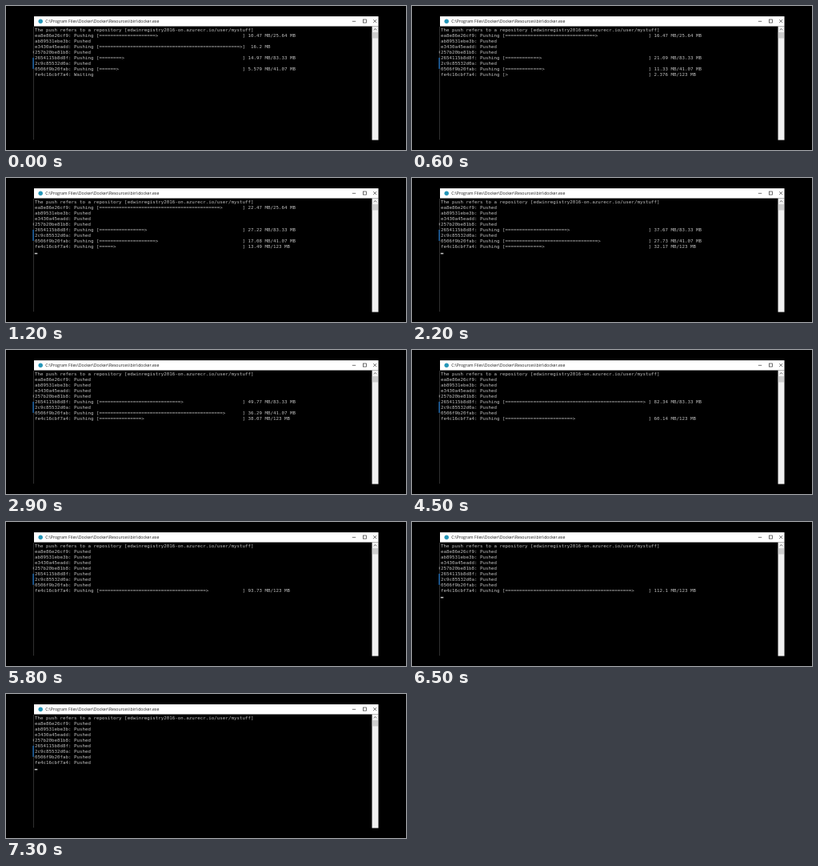
Write an HTML page with a canvas that moves like this. It is 500 px wide and 181 px high and loops after 7400 ms.

```html
<!DOCTYPE html>
<html lang="en">
<head>
<meta charset="utf-8">
<title>Push progress</title>
<style>
  html, body { margin: 0; width: 100%; height: 100%; overflow: hidden; background: #000; }
  canvas { display: block; width: 500px; height: 181px; }
</style>
</head>
<body>
<canvas id="stage" width="500" height="181"></canvas>
<script>
const ctx = document.getElementById('stage').getContext('2d');
const LOOP = 7400, STEP = 100;
const LEFT = 35.9, BASE = 32.1, PITCH = 6.94;
const TITLE = 'C:\\Program Files\\Docker\\Docker\\Resources\\bin\\docker.exe';
const HEAD = 'The push refers to a repository [edwinregistry2016-on.azurecr.io/user/mystuff]';

// points: [ms, MB sent]; a layer waits before its first point and is pushed at `done`
const layers = [
  { id: 'ea8e86e26cf9', total: 25.64, done: 1800, points: [[0, 10.47], [1200, 22.47], [1700, 27.2]] },
  { id: 'ab89531ebe3b', done: 0 },
  { id: 'e3430a45eadd', total: 16.19, done: 500, points: [[0, 16.2]] },
  { id: '257b20be81b8', done: 0 },
  { id: '2654115b8d8f', total: 83.33, done: 5000,
    points: [[0, 14.97], [1200, 27.22], [2200, 37.67], [3600, 61.86], [4500, 82.34], [4800, 86.9]] },
  { id: '2c9c85532d0a', done: 0 },
  { id: '0506f9b20fab', total: 41.07, done: 3500,
    points: [[0, 5.579], [1200, 17.08], [2200, 27.73], [3400, 42.4]] },
  { id: 'fe4c16cbf7a4', total: 123, done: 7100,
    points: [[500, 0.524], [1200, 13.49], [2200, 32.17], [3600, 43.97], [4500, 60.14], [5800, 93.73], [7000, 125.2]] }
];

function sent(points, t) {
  const i = points.findIndex(p => p[0] > t);
  if (i < 0) return points[points.length - 1][1];
  const [t0, a] = points[i - 1], [t1, b] = points[i];
  return a + (b - a) * (t - t0) / (t1 - t0);
}

const size = mb => Number(mb.toPrecision(4)) + ' MB';

function status({ id, total, done, points }, t) {
  if (t >= done) return id + ': Pushed';
  if (t < points[0][0]) return id + ': Waiting';
  const mb = sent(points, t);
  const filled = Math.min(50, Math.floor(mb / total * 50));
  const bar = ('='.repeat(filled) + '>').padEnd(51);
  const sizes = size(mb).padStart(8) + (mb <= total ? '/' + size(total) : '');
  return `${id}: Pushing [${bar}] ${sizes}`;
}

function rect(color, x, y, w, h) {
  ctx.fillStyle = color;
  ctx.fillRect(x, y, w, h);
}

function stroke(color, width, ...lines) {
  ctx.strokeStyle = color;
  ctx.lineWidth = width;
  ctx.beginPath();
  for (const [x0, y0, x1, y1] of lines) {
    ctx.moveTo(x0, y0);
    ctx.lineTo(x1, y1);
  }
  ctx.stroke();
}

// Large font scaled down keeps fractional advances exact
function text(str, x, y, px, family, color) {
  ctx.save();
  ctx.translate(x, y);
  ctx.scale(0.1, 0.1);
  ctx.font = `${px * 10}px ${family}`;
  ctx.fillStyle = color;
  ctx.fillText(str, 0, 0);
  ctx.restore();
}

function drawWindow() {
  rect('#000', 0, 0, 500, 181);
  rect('#fff', 35, 13, 430.5, 12.5);
  ctx.fillStyle = '#2496b8';
  ctx.beginPath();
  ctx.arc(43.2, 19.2, 2.7, 0, Math.PI * 2);
  ctx.fill();
  text(TITLE, 49.2, 21, 5.21, '"Open Sans", sans-serif', '#1c1c1c');

  stroke('#333', 0.7, [432.8, 19.3, 437.2, 19.3],
    [459.2, 17, 463.2, 21], [463.2, 17, 459.2, 21]);
  ctx.strokeRect(446.6, 17, 4, 4);

  rect('#f0f0f0', 457.5, 25.5, 8, 143);
  rect('#cdcdcd', 457.8, 33, 7.2, 7.5);
  stroke('#555', 0.8, [459.8, 30.2, 461.5, 28.5], [461.5, 28.5, 463.2, 30.2]);

  // Sliver of the window behind
  rect('#444', 34, 26, 0.7, 142);
  rect('#1f5f9c', 33.3, 65, 1.7, 14);
  rect('#999', 33.8, 56.5, 1, 3);
}

function line(str, row) {
  text(str, LEFT, BASE + row * PITCH, 5.825, '"DejaVu Sans Mono", monospace', '#c0c0c0');
}

function draw(t) {
  drawWindow();
  line(HEAD, 0);
  layers.forEach((layer, i) => line(status(layer, t), i + 1));
  const blink = (t - 730) % 1095;
  if (blink >= 0 && blink < 475) rect('#d0d0d0', 35.8, 94.2, 3.5, 1.4);
}

function tick() {
  const t = performance.now() % LOOP;
  draw(Math.floor(t / STEP) * STEP);
  requestAnimationFrame(tick);
}
tick();
</script>
</body>
</html>
```
